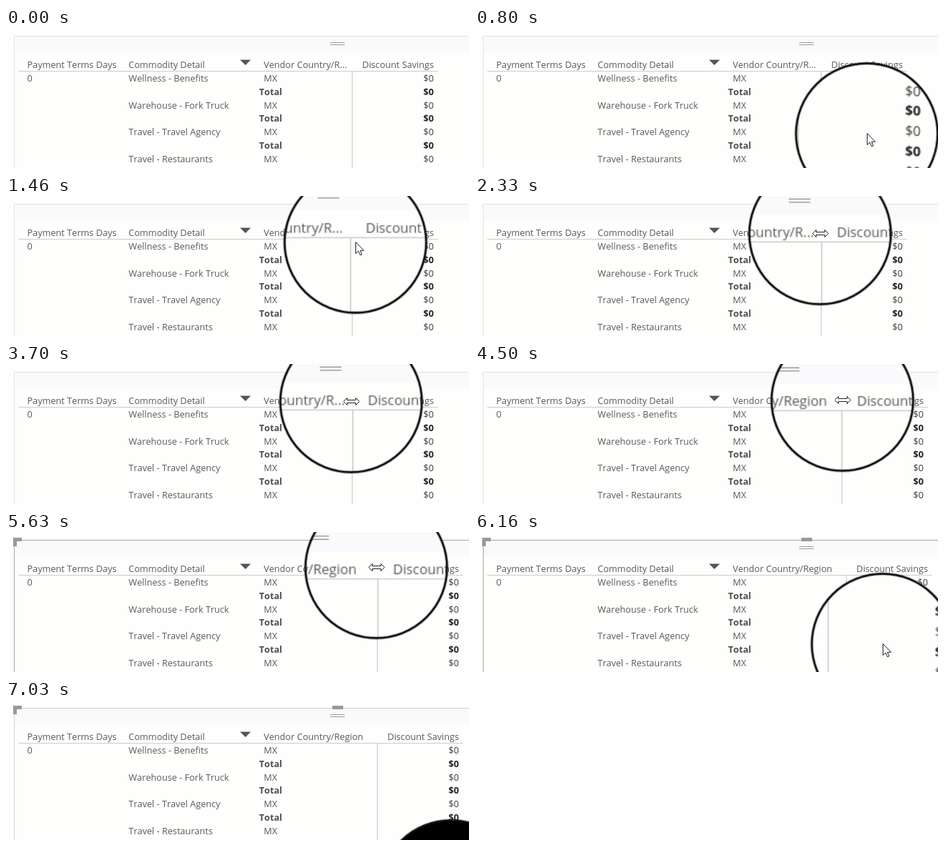
These frames come from a looping animation (644 px wide and 196 px high, 7.33 s). An HTML page with a canvas:

```html
<!DOCTYPE html>
<html lang="en">
<head>
<meta charset="utf-8">
<title>Resizing a table column</title>
<style>
  html, body { margin: 0; width: 100%; height: 100%; overflow: hidden; background: #fff; }
  canvas { display: block; }
</style>
</head>
<body>
<canvas id="stage" width="644" height="196"></canvas>
<script>
const LOOP = 7330, W = 644, H = 196, ZOOM = 1.5, LENS = 98.5;
const stage = document.getElementById('stage').getContext('2d');
const tableCanvas = Object.assign(document.createElement('canvas'), { width: W, height: H });
const table = tableCanvas.getContext('2d');
table.fontKerning = 'none';

// Pointer path: time, x, y
const path = [
  [500, 652, 320], [560, 637, 296], [800, 545, 148], [1000, 506, 94], [1260, 492, 74],
  [1460, 486.5, 65], [1760, 484, 56], [2160, 482, 53.5], [2330, 480, 53],
  [3700, 480, 53], [4030, 491, 52], [4430, 509, 51], [4630, 513, 50.5],
  [4860, 513, 50.5], [5000, 515, 50], [5800, 515, 50],
  [6530, 621, 268], [6830, 620, 267.5], [7030, 619, 267]
];

const slope = (i, axis) => path[i] && path[i + 1]
  ? (path[i + 1][axis] - path[i][axis]) / (path[i + 1][0] - path[i][0]) : 0;

// Harmonic-mean tangents keep the curve free of overshoot
function tangent(i, axis) {
  const a = slope(i - 1, axis), b = slope(i, axis);
  return a * b > 0 ? 2 * a * b / (a + b) : 0;
}

function pointer(t, axis) {
  if (t <= path[0][0]) return path[0][axis];
  const i = path.findIndex((key, k) => k + 1 === path.length || path[k + 1][0] > t);
  if (i === path.length - 1) return path[i][axis];
  const span = path[i + 1][0] - path[i][0], u = (t - path[i][0]) / span;
  const p = path[i][axis], q = path[i + 1][axis];
  const e = u * u * (3 - 2 * u);
  return p + (q - p) * e
    + span * u * (1 - u) * ((1 - u) * tangent(i, axis) - u * tangent(i + 1, axis));
}

// The table follows the pointer slightly late
function columnShift(t) {
  if (t < 3700) return 0;
  return t > 5080 ? 35 : Math.round(pointer(t - 60, 1) - 480);
}

function rect(color, x, y, w, h) {
  table.fillStyle = color;
  table.fillRect(x, y, w, h);
}

function text(string, x, y, { color = '#595959', bold = false, align = 'left' } = {}) {
  table.font = `${bold ? 'bold ' : ''}12.65px "Open Sans", "Noto Sans", sans-serif`;
  table.fillStyle = color;
  table.textAlign = align;
  table.fillText(string, x, y);
}

function ellipsize(string, width) {
  if (table.measureText(string).width <= width) return string;
  while (table.measureText(string + '...').width > width) string = string.slice(0, -1);
  return string + '...';
}

function drawTable(shift, selected, hovered) {
  rect('#fefefd', 0, 0, W, H);
  rect('#fafafc', 12, 12, W, 23);
  const border = !selected ? '#e2e2e2' : hovered ? '#a6a6a6' : '#d0d0d0';
  rect(border, 11, 11, W, 1);
  rect(border, 11, 11, 1, H);
  rect('#999', 451, 20, 20, 1);
  rect('#999', 451, 23, 20, 1);
  if (selected) {
    rect('#999', 10, 8, 12, 5);
    rect('#999', 10, 8, 5, 12);
    rect('#999', 454, 8, 15, 5);
  }

  text('Payment Terms Days', 29.5, 56);
  text('Commodity Detail', 170.5, 56);
  text(ellipsize('Vendor Country/Region', 118 + shift), 358.5, 56);
  text('Discount Savings', 595 + shift, 56, { align: 'right' });
  table.fillStyle = '#555';
  table.beginPath();
  table.moveTo(325.5, 44.5);
  table.lineTo(340.5, 44.5);
  table.lineTo(333, 52);
  table.fill();
  rect('#ccc', 17, 60, 584 + shift, 1);
  rect('#c8c8c8', 481 + shift, 60, 1, H);

  const baseline = row => Math.round(75.3 + row * 18.7);
  text('0', 29.5, baseline(0));
  const details = ['Wellness - Benefits', 'Warehouse - Fork Truck',
    'Travel - Travel Agency', 'Travel - Restaurants'];
  details.forEach((detail, i) => {
    const y = baseline(2 * i), totalY = baseline(2 * i + 1), right = 595 + shift;
    text(detail, 170.5, y);
    text('MX', 358.5, y);
    text('$0', right, y, { color: '#3a3a3a', align: 'right' });
    text('Total', 352, totalY, { color: '#4c4c4c', bold: true });
    text('$0', right, totalY, { color: '#222', bold: true, align: 'right' });
  });
}

function ring(x, y, width, color) {
  stage.beginPath();
  stage.arc(x, y, LENS, 0, 2 * Math.PI);
  stage.lineWidth = width;
  stage.strokeStyle = color;
  stage.stroke();
}

function drawLens(x, y) {
  stage.save();
  stage.beginPath();
  stage.arc(x, y, LENS, 0, 2 * Math.PI);
  stage.clip();
  stage.fillStyle = '#000';
  stage.fillRect(0, 0, W, H);
  stage.drawImage(tableCanvas, x * (1 - ZOOM), y * (1 - ZOOM), W * ZOOM, H * ZOOM);
  stage.restore();
  ring(x, y, 4.6, 'rgba(0, 0, 0, .35)');
  ring(x, y, 2.3, '#111');
}

const arrow = new Path2D('M0 0V16L3.7 12.6 6.2 18.3 8.6 17.3 6.1 11.8H11.2Z');
const resize = new Path2D('M-11 0L-6-5V-2H6V-5L11 0 6 5V2H-6V5Z');

function drawCursor(x, y) {
  stage.save();
  stage.translate(x + .5, y - .5);
  stage.fillStyle = '#fff';
  stage.strokeStyle = '#222';
  stage.lineWidth = 1;
  const shape = y < 60 ? resize : arrow;
  stage.fill(shape);
  stage.stroke(shape);
  stage.restore();
}

function frame(now) {
  const t = now % LOOP;
  const x = Math.round(pointer(t, 1)), y = Math.round(pointer(t, 2));
  drawTable(columnShift(t), t >= 5630, y < H);
  stage.drawImage(tableCanvas, 0, 0);
  if (t >= 560) {
    drawLens(x, y);
    drawCursor(x, y);
  }
  requestAnimationFrame(frame);
}
requestAnimationFrame(frame);
</script>
</body>
</html>
```
